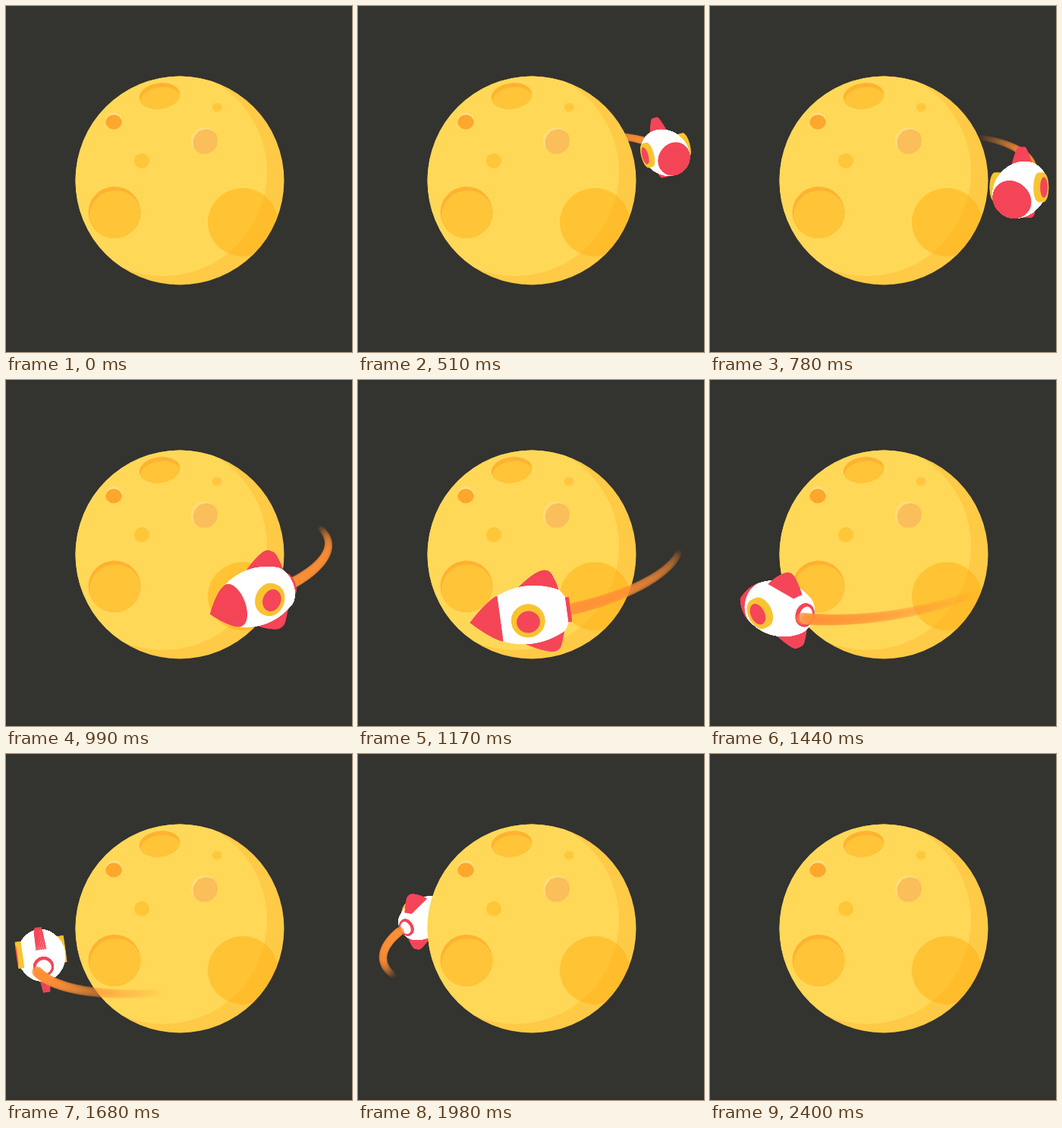
Write an HTML page with a canvas that moves like this. It is 456 px wide and 456 px high and loops after 2.43 s.

```html
<!DOCTYPE html>
<html lang="en">
<head>
<meta charset="utf-8">
<title>Rocket around the moon</title>
<style>
html, body { margin: 0; width: 100%; height: 100%; overflow: hidden; background: #333330; }
canvas { display: block; width: 456px; height: 456px; }
</style>
</head>
<body>
<canvas id="stage" width="456" height="456"></canvas>
<script>
const ctx = document.getElementById('stage').getContext('2d');
const { PI, sin, cos, max } = Math;
const LOOP = 2430, STEP = 30, RAD = PI / 180;
const RED = '#f44658', YELLOW = '#f9c432', WHITE = '#fff';

function oval(x, y, rx, ry, color, turn = 0) {
  ctx.fillStyle = color;
  ctx.beginPath();
  ctx.ellipse(x, y, rx, ry, turn, 0, 2 * PI);
  ctx.fill();
}

// A crater: the inner oval is shifted and cut off by the outer one.
function crater(x, y, rx, ry, rim, color, dx, dy, turn = 0) {
  ctx.save();
  oval(x, y, rx, ry, rim, turn);
  ctx.clip();
  oval(x + dx, y + dy, rx, ry, color, turn);
  ctx.restore();
}

function drawMoon() {
  ctx.save();
  oval(229, 230, 137.5, 137.5, '#ffca46');
  ctx.clip();
  oval(207, 219, 137, 137, '#ffd858');
  oval(312, 285, 46, 45, 'rgba(255,176,16,.5)');
  ctx.restore();
  crater(202.5, 118.5, 27, 17, '#ffb230', '#ffc437', 1, 5.5, -0.14);
  crater(143, 272, 34.5, 34, '#ffb230', '#ffc437', 1.5, 5);
  crater(142, 151.5, 11, 11, '#ffde82', '#ffa62c', 0, 3);
  crater(261.5, 177.5, 17.5, 17.5, '#ffde78', '#fabe5a', 2.5, 2.5);
  oval(278, 133.5, 6.5, 6, '#ffc83c');
  oval(179, 204, 10, 10, '#ffc638');
}

// Orbit angle of the rocket's tail; the near side passes faster.
function orbitAngle(t) {
  const turn = 2 * PI * (t - 1200) / LOOP;
  return 80 * RAD + turn + 0.235 * sin(turn);
}

const orbitPoint = a => [229 + 196 * cos(a), 242.4 - 25.9 * cos(a) + 69 * sin(a)];
const nearness = a => 0.81 + 0.19 * sin(a);

function drawTrail(t, front) {
  const life = 390 - 0.155 * max(0, t - 1700), n = 120;
  ctx.fillStyle = '#ff9138';
  for (let i = n; i >= 0; i--) {
    const u = i / n, a = orbitAngle(t - life * u);
    if (sin(a) > 0 !== front) continue;
    const [x, y] = orbitPoint(a);
    ctx.globalAlpha = 0.35 * (1 - u);
    ctx.beginPath();
    ctx.arc(x, y, 8 * nearness(a) * (1 - 0.3 * u), 0, 2 * PI);
    ctx.fill();
  }
  ctx.globalAlpha = 1;
}

function drawRocket(tail, heading) {
  const s = nearness(heading), c = cos(heading), d = sin(heading);
  // Screen vector of a direction in the orbit plane (x right, z to the viewer)
  const flat = (x, z) => [s * (0.99 * x + 0.046 * z), s * (-0.13 * x + 0.35 * z)];
  const F = flat(-d, c), S = flat(c, d), U = [-0.124 * s, -0.93 * s];
  const left = max(0, -c);
  const [tx, ty] = orbitPoint(tail);
  const ox = tx + 59 * F[0] + 9 * left, oy = ty + 59 * F[1] - 5 * left;
  const at = (f, side, up) => [0, 1].map(k =>
    (k ? oy : ox) + f * F[k] + side * S[k] + up * U[k]);

  function paint(color) {
    ctx.fillStyle = ctx.strokeStyle = color;
    ctx.lineWidth = 1;
    ctx.lineJoin = 'round';
    ctx.fill();
    ctx.stroke();
  }

  function disc(center, P, Q, r, color) {
    ctx.save();
    ctx.transform(P[0], P[1], Q[0], Q[1], ...center);
    ctx.beginPath();
    ctx.arc(0, 0, r, 0, 2 * PI);
    ctx.restore();
    paint(color);
  }

  function slice(f) {
    let r = 38 - 0.0056 * (f + 2) ** 2, color = WHITE;
    if (f < -44) r -= 0.1 * (f + 44) ** 2;
    if (f < -52) { r = 16; color = RED; }
    if (f > 36) { r = 30 * (1 - ((f - 36) / 40) ** 1.3); color = RED; }
    disc(at(f, 0, 0), S, U, max(0, r), color);
  }

  function porthole(side) {
    for (let h = 31; h <= 39; h++) disc(at(0, side * h, 5), F, U, 21.5, YELLOW);
    if (side * d > 0) disc(at(0, side * 39.5, 5), F, U, 15, RED);
  }

  function fin(up, tip) {
    for (let w = -8; w <= 8; w += 2) {
      const p = (f, h) => at(f, w * (1 - (h - 26) / 70), up * h);
      ctx.beginPath();
      ctx.moveTo(...p(6, 38));
      ctx.quadraticCurveTo(...p(-13, tip - 3), ...p(-25, tip));
      ctx.quadraticCurveTo(...p(-36, tip + 2), ...p(-39, tip - 7));
      ctx.quadraticCurveTo(...p(-44, tip - 20), ...p(-45, 26));
      ctx.closePath();
      paint(RED);
    }
  }

  const away = c < 0, nearSide = d > 0 ? 1 : -1;
  porthole(-nearSide);
  fin(-1, 53);
  if (!away) fin(1, 57);
  for (let i = 0; i <= 266; i++) slice(away ? 76 - i / 2 : -57 + i / 2);
  if (away) {
    disc(at(-57, 0, 0), S, U, 12, WHITE);
    fin(1, 57);
  }
  porthole(nearSide);
}

function draw(t) {
  ctx.fillStyle = '#333330';
  ctx.fillRect(0, 0, 456, 456);
  const flying = t >= 240 && t < 2400;
  const tail = orbitAngle(t), heading = tail + 15 * RAD;
  const near = sin(heading) > 0, away = cos(heading) < 0;

  function layer(front) {
    if (!flying) return;
    if (!away) drawTrail(t, front);
    if (near === front) drawRocket(tail, heading);
    if (away) drawTrail(t, front);
  }

  layer(false);
  drawMoon();
  layer(true);
}

const start = performance.now();
function tick() {
  const t = (performance.now() - start) % LOOP;
  draw(Math.floor(t / STEP) * STEP);
  requestAnimationFrame(tick);
}
tick();
</script>
</body>
</html>
```
